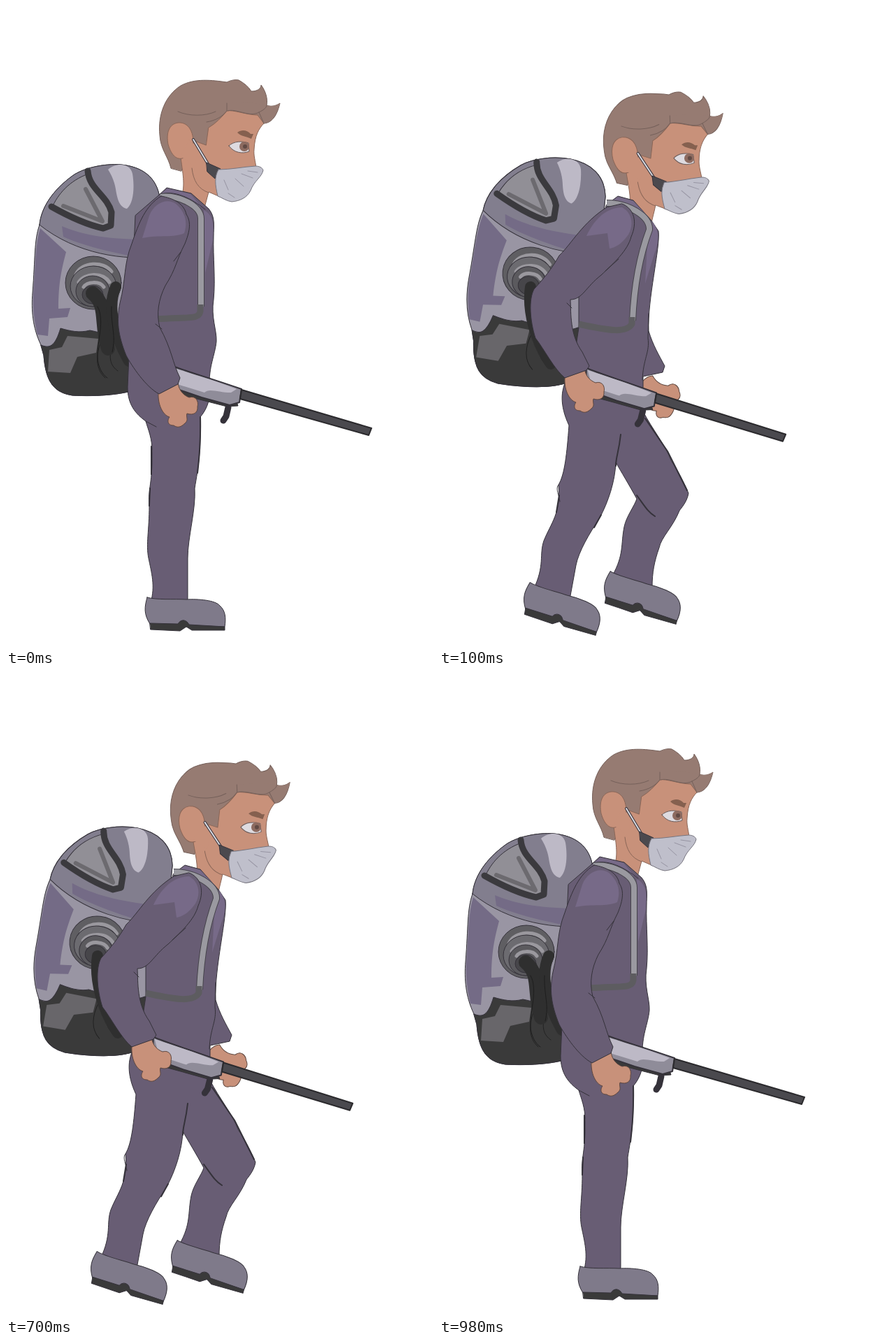
An HTML page for the animation above (1100 ms loop, 611 by 917 pixels).

```html
<!DOCTYPE html>
<html lang="en">
<head>
<meta charset="utf-8">
<title>Walking with a sprayer</title>
<style>
html, body { margin: 0; height: 100%; overflow: hidden; background: #fff; }
svg { display: block; width: 100vw; height: 100vh; }
path, ellipse { stroke: #35323a; stroke-width: 1; stroke-linejoin: round; stroke-linecap: round; }
.suit { fill: #685d74; }
.lit { fill: #776a88; stroke: none; }
.line { fill: none; }
.bold { fill: none; stroke-width: 2; }
.skin { fill: #c8917a; stroke: #8a6657; }
.hair { fill: #967b72; stroke: #75605a; }
.dark { fill: #3a3a3a; }
.hose { fill: none; stroke: #2f2f2f; stroke-width: 16; }
.edge { fill: none; stroke: #3b3a3e; stroke-width: 9; }
.rim { fill: none; stroke: #45434a; stroke-width: 10; stroke-linecap: butt; }
.strap { fill: none; stroke: #9a99a0; stroke-width: 8; stroke-linecap: butt; }
.belt { fill: none; stroke: #5d5c60; stroke-width: 9; stroke-linecap: butt; }
.pale { fill: #bdb9c6; stroke: none; }
.shade { fill: #68666a; stroke: none; }
.arc { fill: none; stroke: #9a989e; stroke-width: 5; }
</style>
</head>
<body>
<svg viewBox="0 0 611 917">
<defs>
  <g id="head">
    <path class="hair" d="M236 232C232 215 221 205 220 185C217 155 228 128 250 114C270 103 295 106 316 109C322 106 328 105 333 106C340 110 347 115 351 122C360 122 365 118 365 113C371 121 375 132 373 142C380 145 388 142 392 139C389 152 383 167 369 168L287 199L268 196L251 236Z"/>
    <path class="skin" d="M290 174C300 168 308 160 316 150C325 148 345 156 360 156L369 168C362 175 356 185 355 205C354 214 357 222 358 232L330 262L304 272L290 266C288 275 285 283 283 292L251 273C256 258 254 245 250 217L262 190L286 199Z"/>
    <path class="hair" style="stroke:none" d="M316 150C330 146 348 160 362 152L369 168C381 166 389 152 392 139C386 143 380 144 373 142L350 138L318 139Z"/>
    <path class="line" style="stroke:#75605a" d="M246 151C262 158 285 158 300 151M287 166C300 164 310 158 316 150L316 139M317 150C330 146 348 160 362 152C370 148 373 145 373 142M369 168L362 152"/>
    <path class="skin" d="M268 196C268 175 258 166 246 167C233 169 229 182 232 198C236 212 243 220 252 218C258 217 262 210 268 196Z"/>
    <path class="skin" style="stroke:none" d="M250 215L262 190L275 205L270 230Z"/>
    <path class="line" style="stroke:#8a6657" d="M266 232C268 250 275 262 290 267"/>
    <path style="fill:#85604f;stroke:none" d="M331 181C338 176 345 178 350 183L354 183L351 190C343 186 337 187 331 181Z"/>
    <path style="fill:#dedbe0;stroke:#6a5a58" d="M319 200C326 193 338 193 347 196L348 208C338 212 326 210 319 200Z"/>
    <ellipse cx="341" cy="201" rx="7" ry="7" style="fill:#8d6b60;stroke:none"/>
    <ellipse cx="342" cy="201" rx="3" ry="3" style="fill:#614a44;stroke:none"/>
    <path class="bold" style="stroke-width:4" d="M268 191L289 226"/>
    <path class="bold" style="stroke:#d8d8df" d="M268 191L289 226"/>
    <path style="fill:#4b494e" d="M287 224L307 233L299 247L288 237Z"/>
    <path style="fill:#bfbfcb;stroke:#77757f" d="M304 234C322 234 340 230 357 229C362 229 367 231 368 235C366 245 355 250 350 264C345 274 335 279 323 280C315 279 309 274 303 272C299 255 298 245 304 234Z"/>
    <path class="line" style="stroke:#9694a2" d="M337 240L353 246M328 247L340 258M312 249L318 263M318 268L327 274M346 236L360 238"/>
  </g>

  <g id="pack">
    <path style="fill:#9995a3" d="M48 313C50 290 65 265 95 243C110 232 140 225 165 227C195 230 216 245 220 275V340C215 420 200 480 194 545C175 556 130 559 95 557C70 553 57 540 54 500L50 485C38 460 36 435 38 410C42 360 40 335 48 313Z"/>
    <path style="fill:#827e8e" d="M48 313C50 290 65 265 95 243C110 232 140 225 165 227C195 230 216 245 220 275V358C170 365 100 355 48 313Z"/>
    <path class="lit" style="fill:#746b86" d="M49 318L86 352C80 375 75 395 75 433L92 432L88 445L62 447L60 472L45 470C38 440 38 420 40 400C42 370 42 340 49 318ZM80 315C110 328 150 334 200 334L185 359C150 352 110 343 82 330Z"/>
    <path class="pale" d="M146 234C158 223 178 225 181 240C184 258 183 282 173 290C162 288 159 275 157 262C155 250 150 240 146 234Z"/>
    <path style="fill:#918f96" d="M118 240C90 250 74 270 66 288L140 320C152 312 150 295 146 284Z"/>
    <path class="bold" style="stroke:#6c6a6f;stroke-width:6" d="M82 286L138 308L114 262"/>
    <path class="edge" d="M117 236C119 262 144 270 151 295L150 314L139 318C112 312 88 300 65 287"/>
    <path class="dark" d="M50 485C62 490 70 488 78 461C92 465 105 468 120 464C140 468 180 480 207 462L194 545C175 556 130 559 95 557C70 553 57 540 54 500Z"/>
    <path class="shade" d="M62 492L80 488L88 472L132 476L129 496L102 502L92 525L60 523Z"/>
    <ellipse cx="125" cy="396" rx="40" ry="38" style="fill:#5f5e62"/>
    <path class="arc" d="M100 384C108 366 140 364 151 380"/>
    <ellipse cx="125" cy="401" rx="33" ry="29" style="fill:#6c6b70"/>
    <path class="arc" d="M104 395C112 382 138 380 148 395"/>
    <ellipse cx="124" cy="408" rx="24" ry="22" style="fill:#5b5a5e"/>
    <path class="arc" d="M111 402C116 394 134 393 140 402"/>
    <ellipse cx="124" cy="413" rx="15" ry="13" style="fill:#47464a"/>
    <path class="line" style="stroke:#222" d="M136 480C128 500 128 520 142 532M152 485C146 505 150 515 160 522"/>
  </g>

  <g id="gun">
    <path class="dark" d="M240 540L330 566L332 572L316 573L250 556Z"/>
    <path class="bold" style="stroke-width:9" d="M318 574L315 587L311 593"/>
    <path style="fill:#8f8c99;stroke-width:2" d="M236 514C255 522 285 530 337 548L334 567L320 571L280 560L236 545Z"/>
    <path class="pale" d="M238 517C265 526 300 536 330 548L322 553C305 553 290 546 284 553L245 541Z"/>
    <path style="fill:#4a494e;stroke:#2b2a2d;stroke-width:2" d="M337 549L523 604L519 614L335 562Z"/>
  </g>

  <path id="hand" class="skin" style="stroke:#5d463e" d="M218 553C222 543 238 536 246 539C248 552 255 557 262 560C272 557 276 566 274 573C275 582 268 586 259 583C257 588 262 592 256 597C248 605 243 602 240 600C230 600 231 592 234 588C224 585 217 570 218 553Z"/>

  <g id="shoe">
    <path style="fill:#7f7a8a" d="M202 846C215 850 240 848 258 849C275 848 300 850 306 858C314 865 315 875 313 888L206 884C197 870 198 860 202 846Z"/>
    <path class="dark" d="M206 883L246 884C250 877 258 877 262 885L313 888V893H266L258 888L249 894L207 892Z"/>
  </g>
</defs>

<g class="pose">
  <use href="#pack"/>
  <path class="hose" style="stroke-width:20" d="M124 411C146 430 134 450 146 490"/>
  <path class="hose" d="M157 402C142 435 160 480 176 508"/>
  <path class="line" style="stroke:#1e1e1e" d="M131 430C142 450 130 480 131 502C131 515 138 528 145 532M151 430C150 460 158 470 152 495"/>
  <use href="#head"/>
  <path class="suit" d="M217 272L230 260L265 268L290 290C300 302 297 315 297 330C296 360 300 390 297 420C293 445 302 465 301 480C299 500 290 515 291 545C293 560 289 575 278 588C279 640 275 660 270 690C272 720 260 760 260 790L260 853H207C214 830 208 810 204 790C200 770 205 750 205 715C203 690 210 680 209 640C210 620 203 605 200 594C185 583 174 570 174 545L185 300Z"/>
  <use href="#shoe"/>
  <path class="lit" d="M283 292C300 300 296 320 296 335L285 382ZM222 269L231 261L264 269L280 288Z"/>
  <path class="line" d="M200 594L215 602M219 270C240 262 265 275 285 291"/>
  <path class="bold" d="M278 588C279 630 276 650 274 668M208 630V670M206 690L205 715"/>
  <path class="rim" d="M221 273C248 270 279 286 279 304V430"/>
  <path class="strap" d="M221 273C248 270 279 286 279 304V430"/>
  <path class="belt" d="M278 427V437C276 448 265 445 215 448"/>
  <use href="#gun"/>
  <use href="#hand"/>
  <path class="suit" d="M222 272C240 275 255 283 258 298C266 310 262 325 256 340C243 365 244 375 228 400C218 420 215 440 220 460C237 490 238 510 249 532L246 541L219 555C200 545 180 515 172 500C160 470 158 450 163 425C172 390 168 370 180 340C190 310 200 285 222 272Z"/>
  <path class="lit" d="M205 300C212 282 230 274 243 283C257 295 260 310 255 325C240 332 220 327 195 332Z"/>
  <path class="line" d="M250 352L240 365M214 455L223 462"/>
</g>

<g class="pose">
  <use href="#pack" transform="translate(6 -13) rotate(6 125 396)"/>
  <path class="hose" d="M131 402C126 435 138 480 160 512"/>
  <use href="#head" transform="translate(16.5 18.5) rotate(-2.5 300 190)"/>
  <use href="#hand" transform="translate(71 -12) rotate(-20 246 572)"/>
  <path class="suit" d="M240 284L256 272L278 278L304 307L314 322C317 345 298 420 300 465C306 485 315 500 323 515L320 524L292 530L292 580C305 605 325 630 332 650C345 670 352 685 357 697C355 710 345 720 344 722C335 745 318 760 315 775C308 795 305 810 305 832L248 815C265 785 260 770 265 745C268 730 280 715 283 705C272 685 260 665 253 653C252 680 242 710 230 732C215 755 200 780 196 800L187 849L135 835C152 800 143 785 150 765C160 740 175 725 171 685C180 670 183 640 186 600C172 570 175 550 182 535L191 520L200 460V400Z"/>
  <use href="#shoe" transform="translate(31 -38) rotate(16 206 890)"/>
  <use href="#shoe" transform="translate(-84 -22) rotate(16 206 890)"/>
  <path class="lit" d="M300 305C316 315 316 335 308 355L295 397ZM245 281L256 273L278 279L300 302Z"/>
  <path class="line" d="M300 440L299 475C302 495 292 505 291 535M171 685C166 690 172 700 173 709"/>
  <path class="bold" d="M260 613C257 640 253 645 253 658M283 700C294 715 299 724 309 730M295 590L327 637L355 693M172 700L168 724M232 728L222 746"/>
  <path class="rim" d="M240 282C270 282 302 300 301 320C286 360 279 405 277 450"/>
  <path class="strap" d="M240 282C270 282 302 300 301 320C286 360 279 405 277 450"/>
  <path class="belt" d="M276 445V455C268 468 245 465 200 455"/>
  <use href="#gun" transform="translate(-26 5.5) rotate(1 336 555)"/>
  <use href="#hand" transform="translate(-38 -21)"/>
  <path class="suit" d="M262 283C280 290 284 310 275 330C270 350 250 368 232 385C210 402 205 420 188 420C189 440 187 470 205 495L215 515L211 521L180 532C165 520 150 490 138 475C130 450 128 420 136 405C150 390 162 375 172 357C190 340 205 310 240 288Z"/>
  <path class="lit" d="M211 329C222 305 240 288 262 288C278 297 278 315 271 327C263 338 255 345 244 347L241 325Z"/>
  <path class="line" d="M257 362L238 379M183 425L190 432"/>
</g>

<g class="pose">
  <use href="#pack" transform="translate(6 -13) rotate(6 125 396)"/>
  <path class="hose" style="stroke-width:20" d="M120 380C108 405 125 435 148 460"/>
  <use href="#head" transform="translate(64 59.5) rotate(7 300 190)"/>
  <use href="#hand" transform="translate(88 -67) rotate(-20 246 572)"/>
  <path class="suit" d="M262 303L285 297L309 299L324 322C330 340 334 355 326 370C322 390 305 420 299 443L327 468L322 481L298 484L284 505L285 575C300 605 325 630 332 650C345 675 358 695 359 712C357 740 362 780 361 848H306C315 815 308 800 297 785C292 770 300 755 300 735C285 715 265 670 247 657C238 690 220 720 203 746C190 765 170 775 162 795L148 856L96 834C118 800 108 785 118 768C130 745 150 735 148 693C151 684 158 685 162 682C170 660 178 640 177 600C165 590 163 570 167 560C175 545 176 535 182 520L203 470V395Z"/>
  <use href="#shoe" transform="translate(106) rotate(-4 206 890)"/>
  <use href="#shoe" transform="translate(-125 -21) rotate(21 206 890)"/>
  <path class="lit" d="M324 342C336 355 329 375 319 390L288 420ZM285 299L308 301L326 335Z"/>
  <path class="line" d="M298 443C303 465 298 475 294 485M162 682C150 685 147 695 154 702"/>
  <path class="line" style="stroke:#8b8892" d="M290 515C297 545 295 560 289 573"/>
  <path class="bold" d="M258 617C251 640 244 658 236 680L205 745M276 690C285 705 294 735 311 745M285 576L327 638L358 710M155 695L146 727"/>
  <path class="rim" d="M262 297C292 295 327 322 326 347C320 372 285 395 253 470"/>
  <path class="strap" d="M262 297C292 295 327 322 326 347C320 372 285 395 253 470"/>
  <path class="belt" d="M256 468L248 477C230 478 215 465 200 457"/>
  <use href="#gun" transform="translate(-15 -61) rotate(-11 336 555)"/>
  <use href="#hand" transform="translate(-26 -58)"/>
  <path class="suit" d="M275 303C298 298 303 320 291 345C280 372 260 378 240 382C215 388 200 410 175 405C182 425 195 445 213 465L217 478L192 502C180 502 160 485 150 470C138 445 125 420 118 400C115 385 125 375 140 365C170 350 180 340 205 328C230 312 255 300 275 303Z"/>
  <path class="lit" d="M229 328C250 308 285 300 294 313C296 330 288 340 275 350L255 368L246 335Z"/>
  <path class="line" d="M271 374L247 382M173 401L178 409"/>
</g>
</svg>
<script>
const LOOP = 1100;
const steps = [[0, 0], [100, 1], [200, 2], [700, 1], [800, 0]]; // [start ms, pose]
const poses = document.querySelectorAll('.pose');

function draw(now) {
  const t = now % LOOP;
  const [, active] = steps.findLast(([start]) => t >= start);
  poses.forEach((pose, i) => pose.style.display = i === active ? '' : 'none');
}

const begin = performance.now();
function tick() {
  draw(performance.now() - begin);
  requestAnimationFrame(tick);
}
tick();
</script>
</body>
</html>
```
